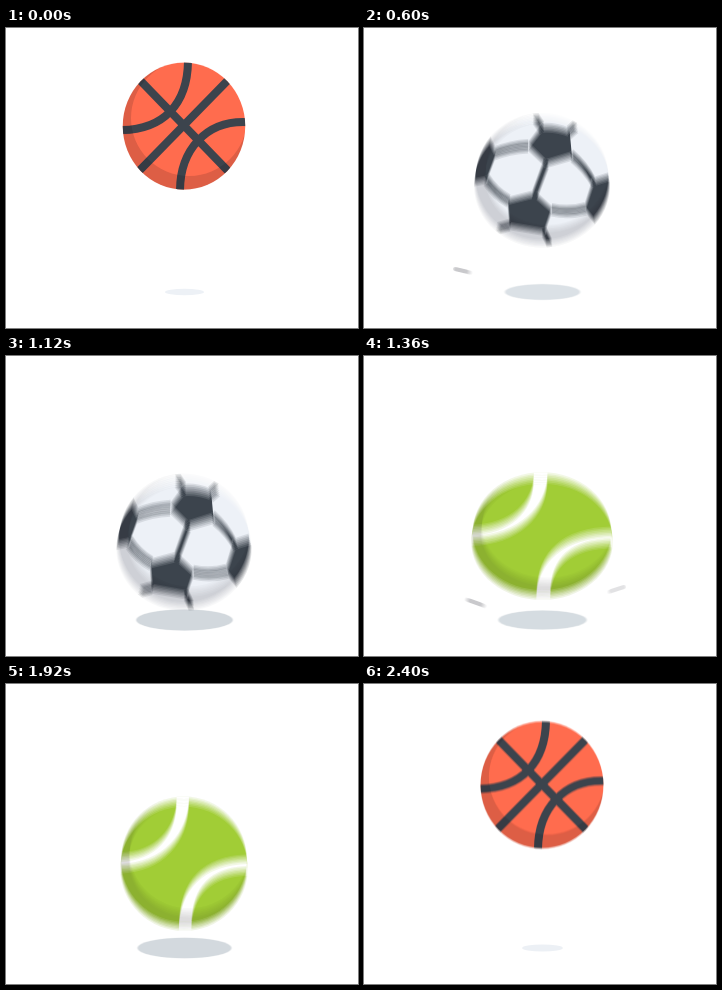
These frames come from a looping animation (352x300 px, 2440 ms). An HTML page with a canvas:

```html
<!DOCTYPE html>
<html lang="en">
<head>
<meta charset="utf-8">
<title>Bouncing balls</title>
<style>
  html, body { margin: 0; width: 100%; height: 100%; overflow: hidden; background: #fff; }
  canvas { display: block; }
</style>
</head>
<body>
<canvas id="stage" width="352" height="300"></canvas>
<script>
const LOOP = 2440, STEP = 40, BOUNCE = LOOP / 3, HALF = BOUNCE / 2;
const CX = 178, REST_Y = 98, RX = 61.2, RY = 63.5;
const SHUTTER = 22, SAMPLES = 8;
const DARK = '#3c444d';

const screen = document.getElementById('stage').getContext('2d');
const buffer = document.createElement('canvas');
buffer.width = 352;
buffer.height = 300;
const g = buffer.getContext('2d');

const clamp = (v, lo = 0, hi = 1) => Math.max(lo, Math.min(hi, v));

// Half width of the ball over one bounce, measured from the top
const WIDTHS = [[0, 61.2], [240, 61.8], [300, 63.3], [360, 73], [405, 79],
  [460, 77], [547, 70], [610, 64.5], [700, 61.8], [BOUNCE, 61.2]];

function track(keys, t) {
  const i = Math.max(1, keys.findIndex(k => k[0] >= t));
  const [t0, a] = keys[i - 1], [t1, b] = keys[i];
  return a + (b - a) * (t - t0) / (t1 - t0);
}

function fill(d, color) {
  g.fillStyle = color;
  g.fill(new Path2D(d));
}

function stroke(d, color, width) {
  g.strokeStyle = color;
  g.lineWidth = width;
  g.stroke(new Path2D(d));
}

// Markings use stage coordinates of the ball resting at its highest point
const balls = [
  {
    color: '#ff6c4e', size: 1,
    marks() {
      stroke(`M132 50L224 145M223 51L132 144
        M182 32C182 75 158 102 114 102M241 94C200 92 174 122 174 163`, DARK, 8);
    }
  },
  {
    color: '#edf1f7', size: 1.025,
    marks() {
      stroke(`M178 43L170 30M203 48L213 38M182 80L171 113M165 62Q148 63 132 70
        M206 72Q219 84 226 99M126 97Q134 111 147 119M187 128Q203 132 219 127
        M180 151L186 165M148 144L132 149`, DARK, 5);
      fill(`M178 43Q191 42 204 48L206 72L182 80L165 62Z
        M146 119L171 112L187 128L180 151L148 145Z
        M108 101L126 97L135 70L128 54L106 60Z
        M246 92L226 99L218 127L229 142L248 132Z`, DARK);
    }
  },
  {
    color: '#a1cd36', size: 1,
    marks() {
      stroke('M177 30C177 68 155 97 112 97M243 99C200 99 179 122 179 165', '#fff', 12);
    }
  }
];

function drawBall(ball, phase) {
  const rx = track(WIDTHS, phase);
  const ry = 63.5 - (rx - RX) * 0.58;
  const drop = phase < HALF
    ? 80.5 * (phase / 293) ** 1.75
    : 77 * ((BOUNCE - phase) / 266) ** 1.75;
  const bottom = Math.min(266, REST_Y + RY + drop);

  g.save();
  g.translate(CX, bottom - ry);
  g.scale(rx / RX, ry / RY);
  g.translate(-CX, -REST_Y);
  g.beginPath();
  g.ellipse(CX, REST_Y, RX * ball.size, RY * ball.size, 0, 0, 7);
  g.fillStyle = ball.color;
  g.fill();
  g.clip();
  ball.marks();
  g.beginPath();
  g.rect(90, 0, 180, 200);
  g.arc(183, 90, 58, 0, 2 * Math.PI);
  g.fillStyle = 'rgba(20,10,20,.14)';
  g.fill('evenodd');
  g.restore();
}

function drawShadow(phase) {
  const s = (1 - Math.cos(Math.PI * phase / HALF)) / 2;
  g.fillStyle = `rgb(${237 - 31 * s},${241 - 28 * s},${246 - 28 * s})`;
  g.beginPath();
  g.ellipse(178.5, 264, 19.5 + 33.5 * s, 3.2 + 8.6 * s, 0, 0, 7);
  g.fill();
}

// Short dash running along a quadratic curve
function drawSpark([a, b, c], tail, head, color) {
  tail = clamp(tail);
  head = clamp(head);
  if (head - tail < 0.02) return;
  const at = u => [0, 1].map(i =>
    (1 - u) ** 2 * a[i] + 2 * u * (1 - u) * b[i] + u * u * c[i]);
  g.lineCap = 'round';
  stroke(`M${at(tail)}L${at(head)}`, color, 4);
  g.lineCap = 'butt';
}

function drawSparks(phase) {
  const right = (phase - 360) * 0.00358;
  if (phase > 346 && phase < 558) {
    const tone = 212 + 16 * clamp((phase - 440) / 110);
    drawSpark([[224, 259], [234, 236], [260, 231]], right + 0.05, right + 0.33,
      `rgb(${tone},${tone},${tone + 2})`);
  }
  const left = (phase - 424) * 0.0057;
  drawSpark([[138, 259], [114, 245], [91, 241]], left - 0.28, left, '#c9c9cc');
}

function drawScene(ball, phase) {
  g.fillStyle = '#fff';
  g.fillRect(0, 0, 352, 300);
  drawShadow(phase);
  drawBall(ball, phase);
  drawSparks(phase);
}

function render(now) {
  const t = Math.floor(now % LOOP / STEP) * STEP;
  const ball = balls[Math.floor((t + HALF) / BOUNCE) % 3];
  // Averaging several moments gives the motion blur
  for (let i = 0; i < SAMPLES; i++) {
    const moment = t + ((i + 0.5) / SAMPLES - 0.5) * SHUTTER;
    drawScene(ball, (moment + LOOP) % BOUNCE);
    screen.globalAlpha = 1 / (i + 1);
    screen.drawImage(buffer, 0, 0);
  }
}

const start = performance.now();
function tick() {
  render(performance.now() - start);
  requestAnimationFrame(tick);
}
tick();
</script>
</body>
</html>
```
